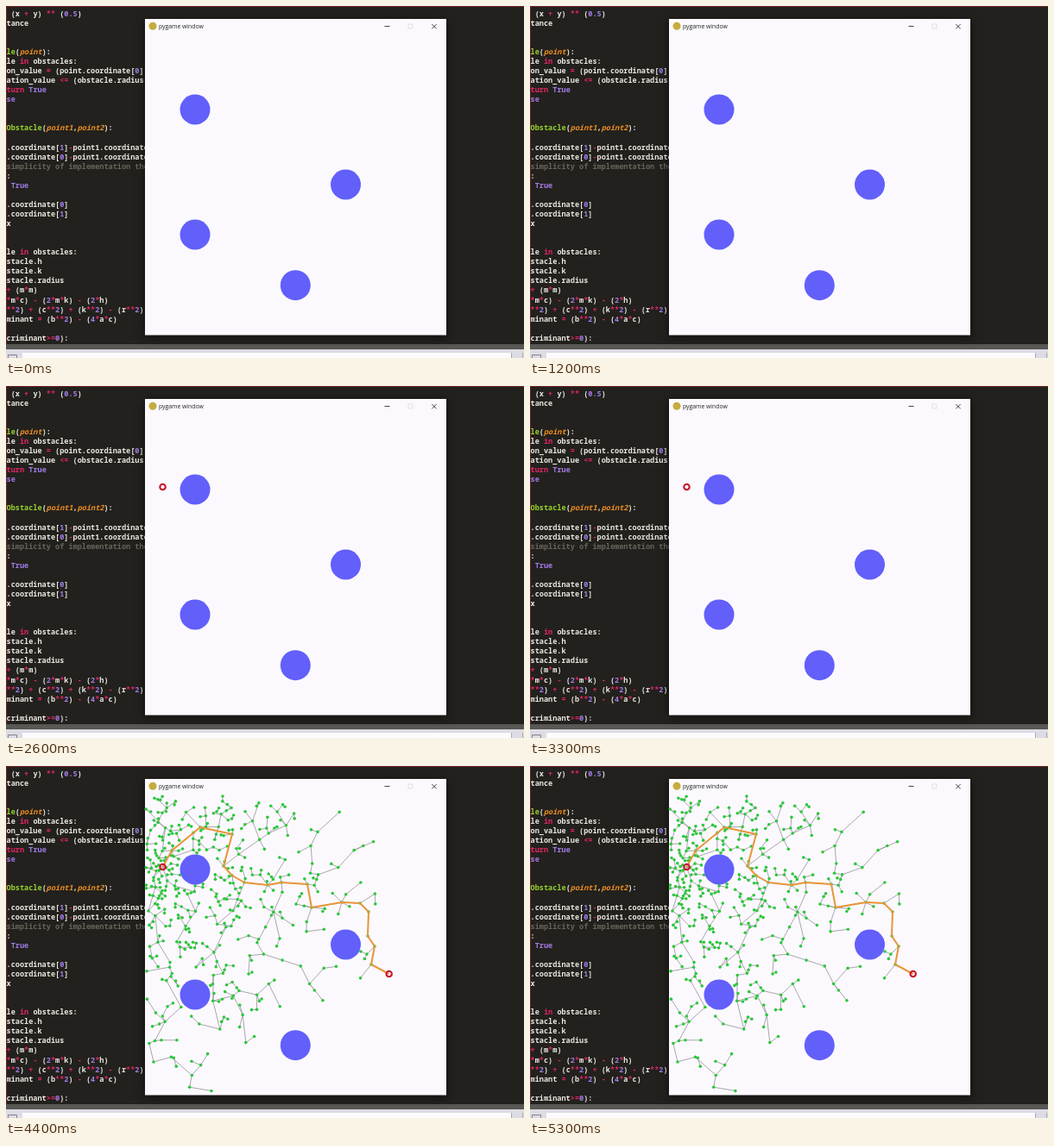
Animation, 600 px wide and 408 px high, one loop 5400 ms. Source, as an HTML page with a canvas:

```html
<!DOCTYPE html>
<html lang="en">
<head>
<meta charset="utf-8">
<title>Random tree path planning</title>
<style>
html, body { margin: 0; overflow: hidden; background: #22211d; }
canvas { display: block; }
</style>
</head>
<body>
<canvas id="stage" width="600" height="408"></canvas>
<script>
const ctx = document.getElementById('stage').getContext('2d');
const LOOP = 5400, START_SHOWN = 1600, GOAL_SHOWN = 3400, TREE_START = 3400, TREE_DONE = 4100;
const CHAR = 5.13, LINE = 11.06;
const PAPER = '#fbf9fd';
const TWIGS = 420, REACH = 36;
const START = [181.5, 117], GOAL = [443.7, 241];
const OBSTACLES = [[219, 120], [393.5, 207], [219, 265], [335.3, 323.7]];
const PATH = [START, [192, 98], [225, 71], [262, 79], [252, 116], [262, 127], [276, 135], [303, 138],
  [319, 135], [349, 137], [354, 164], [389, 158], [410, 159], [420, 169], [419, 197], [427, 209], [423, 230], GOAL];

const CODE = ` (x + y) ** (0.5)
tance


le(point):
le in obstacles:
on_value = (point.coordinate[0]
ation_value <= (obstacle.radius
turn True
se


Obstacle(point1,point2):

.coordinate[1]-point1.coordinate
.coordinate[0]-point1.coordinate
simplicity of implementation the
:
 True

.coordinate[0]
.coordinate[1]
x


le in obstacles:
stacle.h
stacle.k
stacle.radius
+ (m*m)
*m*c) - (2*m*k) - (2*h)
**2) + (c**2) + (k**2) - (r**2)
minant = (b**2) - (4*a*c)

criminant>=0):`.split('\n');

let seed = 71;
const random = () => (seed = seed * 16807 % 2147483647) / 2147483647;
const gap = (a, b) => Math.hypot(a[0] - b[0], a[1] - b[1]);
const mix = (a, b, k) => [a[0] + (b[0] - a[0]) * k, a[1] + (b[1] - a[1]) * k];
const inWindow = ([x, y]) => x > 162 && x < 508 && y > 34 && y < 379;
const isClear = (a, b) => [0.25, 0.5, 0.75, 1].every(k => OBSTACLES.every(o => gap(mix(a, b, k), o) > 18.5));

// Each sample inside a widening frontier joins its nearest node; the route joins as the frontier passes it.
function growTree() {
  const nodes = [{ at: START }];
  let step = 1, grown = 0;
  while (grown < TWIGS) {
    const progress = grown / TWIGS;
    const t = TREE_START + (TREE_DONE - TREE_START) * progress;
    const frontier = 40 + 252 * Math.sqrt(progress);
    while (step < PATH.length - 1 && gap(PATH[step], START) < frontier) {
      nodes.push({ at: PATH[step], from: PATH[step - 1], t });
      step++;
    }
    const r = frontier * random() ** 0.8, angle = random() * 2 * Math.PI;
    const at = [START[0] + r * Math.cos(angle), START[1] + r * Math.sin(angle)];
    if (!inWindow(at)) continue;
    const from = nodes.reduce((a, b) => gap(b.at, at) < gap(a.at, at) ? b : a).at;
    const length = gap(from, at);
    if (length < 3 || length > REACH || !isClear(from, at)) continue;
    nodes.push({ at, from, t });
    grown++;
  }
  return nodes.slice(1);
}
const tree = growTree();

function box(color, x, y, w, h) {
  ctx.fillStyle = color;
  ctx.fillRect(x, y, w, h);
}

function disc(color, [x, y], r) {
  ctx.fillStyle = color;
  ctx.beginPath();
  ctx.arc(x, y, r, 0, 7);
  ctx.fill();
}

function line(color, width, points) {
  ctx.strokeStyle = color;
  ctx.lineWidth = width;
  ctx.beginPath();
  points.forEach(p => ctx.lineTo(...p));
  ctx.stroke();
}

function ring([x, y]) {
  ctx.strokeStyle = '#c9142b';
  ctx.lineWidth = 2.1;
  ctx.beginPath();
  ctx.arc(x, y, 3.2, 0, 7);
  ctx.stroke();
}

const TOKENS = /(?<comment>^simplicity.*)|(?<name>^\w+(?=\(p))|(?<param>point\d?(?=[,)]))|(?<op>[*+=<>-]+|\b(?:in|turn)\b)|(?<value>\b\d(?:\.\d)?|True|^se$)|(?<plain>[\w.]+|[^\s\w])/g;
const COLORS = { comment: '#68655a', name: '#98d22d', param: '#ef8f22', op: '#e62668', value: '#a47be8', plain: '#e9e8e2' };

function drawEditor() {
  box('#22211d', 0, 0, 600, 408);
  CODE.forEach((text, row) => {
    for (const m of text.matchAll(TOKENS)) {
      const kind = Object.keys(COLORS).find(k => m.groups[k]);
      ctx.font = (kind === 'param' ? 'italic ' : '') + '600 8.55px "Noto Sans Mono", monospace';
      ctx.fillStyle = COLORS[kind];
      ctx.fillText(m[0], 0.6 + m.index * CHAR, 11.7 + row * LINE);
    }
  });
  box('#74232a', 0, 0, 600, 1);
  box('#74232a', 0, 0, 1, 392);
  box('#595754', 0, 392, 600, 6);
  box('#dddbe3', 0, 398, 600, 10);
  box('#fcfbfe', 19, 402, 566, 6);
  box('#aaa8b1', 585, 402, 1, 6);
  box('#aaa8b1', 598, 402, 1, 6);
  line('#85838b', 1, [[2.5, 408], [2.5, 404.5], [12.5, 404.5], [12.5, 408]]);
}

function drawWindow() {
  ctx.shadowColor = 'rgba(0,0,0,.55)';
  ctx.shadowBlur = 10;
  ctx.shadowOffsetY = 2;
  box(PAPER, 161, 15, 349, 366.5);
  ctx.shadowColor = 'transparent';
  disc('#c5ab3c', [170, 23.3], 4.5);
  ctx.font = '6.85px "Open Sans", sans-serif';
  ctx.fillStyle = '#222';
  ctx.fillText('pygame window', 177, 26);
  line('#333', 0.9, [[438.5, 23.5], [444.5, 23.5]]);
  ctx.strokeStyle = '#dedce0';
  ctx.strokeRect(466, 21, 5, 5);
  line('#333', 0.9, [[493.3, 21], [498.7, 26.4]]);
  line('#333', 0.9, [[498.7, 21], [493.3, 26.4]]);
}

function draw(now) {
  const t = Math.floor(now % LOOP / 100) * 100;
  drawEditor();
  drawWindow();
  const shown = tree.filter(n => n.t < t);
  shown.forEach(n => line('#8d8a92', 0.75, [n.from, n.at]));
  shown.forEach(n => disc('#2bc83b', n.at, 1.8));
  OBSTACLES.forEach(o => disc('#625ffb', o, 17.5));
  if (t >= TREE_DONE) {
    ctx.lineJoin = 'round';
    line('#e8963a', 2, PATH);
  }
  if (t >= START_SHOWN) ring(START);
  if (t >= GOAL_SHOWN) ring(GOAL);
}

function frame() {
  draw(performance.now());
  requestAnimationFrame(frame);
}
frame();
</script>
</body>
</html>
```
